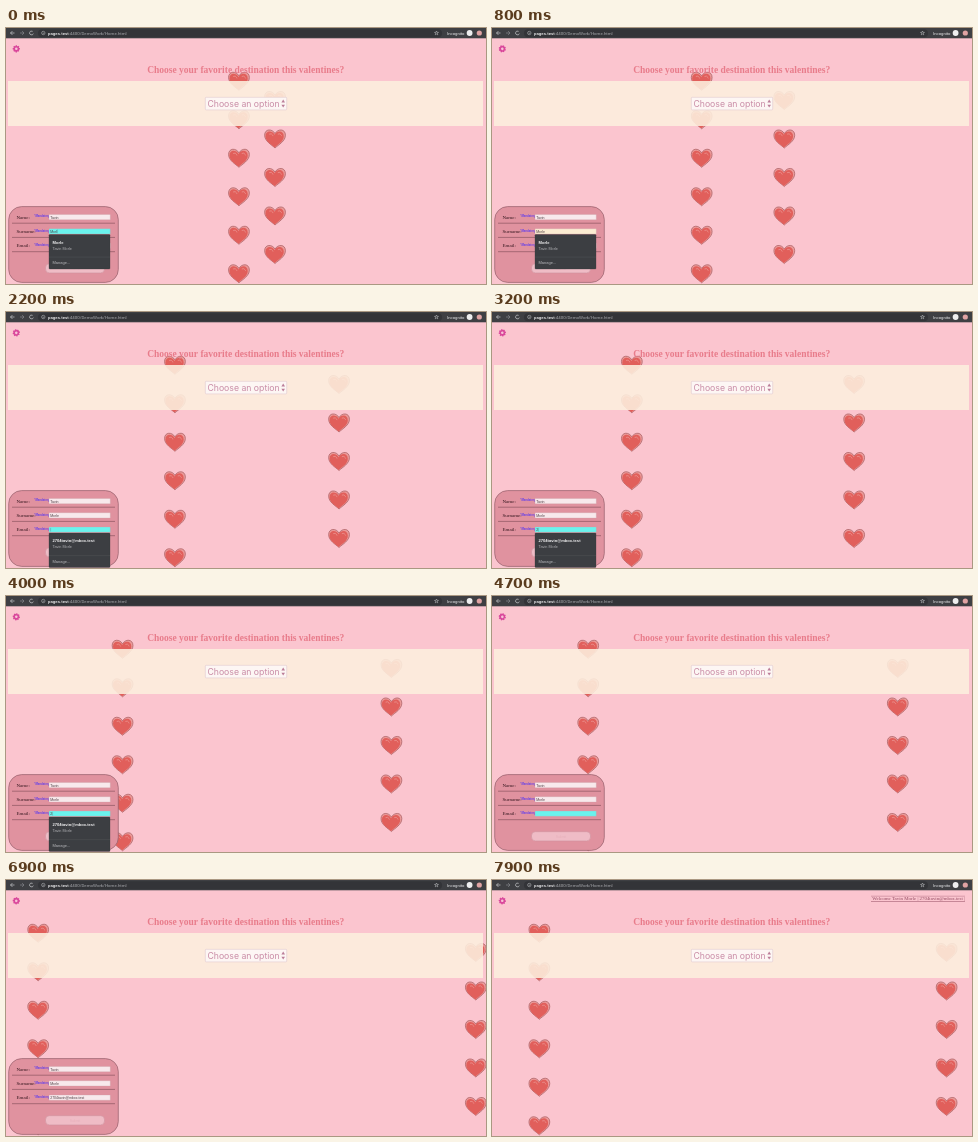
Animation of 480x256 px, one loop 8 s. Source, as an HTML page with a canvas:

```html
<!DOCTYPE html>
<html lang="en">
<head>
<meta charset="utf-8">
<title>Valentines destination</title>
<style>
  html, body { margin: 0; width: 100%; height: 100%; overflow: hidden; background: #fbc5cf; }
  canvas { display: block; width: 480px; height: 256px; }
</style>
</head>
<body>
<canvas id="stage"></canvas>
<script>
const W = 480, H = 256, LOOP = 8;
const SANS = '"Liberation Sans", Arial, sans-serif';
const SERIF = '"Liberation Serif", Times, serif';
const UI = 'Roboto, "Liberation Sans", sans-serif';
const FIRST = 'Tavin', LAST = 'Morle', MAIL = '2704tavin@mbox.test';
const SPEED = 29.1, TURN = 7.14, SUBMIT = 7.4;

const canvas = document.getElementById('stage');
const ctx = canvas.getContext('2d');
const dpr = window.devicePixelRatio || 1;
canvas.width = W * dpr;
canvas.height = H * dpr;

function rect(x, y, w, h, fill) {
  ctx.fillStyle = fill;
  ctx.fillRect(x, y, w, h);
}

function box(x, y, w, h, r, fill, line, width = 0.6) {
  ctx.beginPath();
  ctx.roundRect(x, y, w, h, r);
  ctx.fillStyle = fill;
  ctx.fill();
  if (line) {
    ctx.strokeStyle = line;
    ctx.lineWidth = width;
    ctx.stroke();
  }
}

function disc(x, y, r, fill) {
  ctx.beginPath();
  ctx.arc(x, y, r, 0, Math.PI * 2);
  ctx.fillStyle = fill;
  ctx.fill();
}

function line(color, width, ...pts) {
  ctx.beginPath();
  for (let i = 0; i < pts.length; i += 2) ctx.lineTo(pts[i], pts[i + 1]);
  ctx.strokeStyle = color;
  ctx.lineWidth = width;
  ctx.stroke();
}

function text(str, x, y, font, color, align = 'left') {
  ctx.font = font;
  ctx.fillStyle = color;
  ctx.textAlign = align;
  ctx.fillText(str, x, y);
}

function heartPath() {
  ctx.beginPath();
  ctx.moveTo(0, 9);
  ctx.bezierCurveTo(-3.4, 5.8, -10.4, 2.2, -10.4, -3.8);
  ctx.bezierCurveTo(-10.4, -10.4, -2.8, -10.6, 0, -5.4);
  ctx.bezierCurveTo(2.8, -10.6, 10.4, -10.4, 10.4, -3.8);
  ctx.bezierCurveTo(10.4, 2.2, 3.4, 5.8, 0, 9);
  ctx.closePath();
}

function heart(x, y) {
  ctx.save();
  ctx.translate(x, y);
  heartPath();
  ctx.fillStyle = '#eb9a99';
  ctx.fill();
  ctx.strokeStyle = '#a75c61';
  ctx.lineWidth = 0.7;
  ctx.stroke();
  ctx.translate(-0.4, 0.5);
  ctx.scale(0.88, 0.88);
  heartPath();
  ctx.fillStyle = '#e15f5b';
  ctx.fill();
  for (const lobe of [-4.8, 5]) {
    ctx.beginPath();
    ctx.arc(lobe, -3.4, 3, Math.PI * 1.35, Math.PI * 1.95);
    ctx.strokeStyle = '#efa39f';
    ctx.lineWidth = 0.7;
    ctx.stroke();
  }
  ctx.restore();
}

function hearts(t) {
  const shift = SPEED * (t < TURN ? t : 2 * TURN - t);
  for (let i = 0; i < 6; i++) heart(233 - shift, 53.3 + i * 38.5);
  for (let i = 0; i < 5; i++) heart(269 + shift, 72.5 + i * 38.5);
}

function toolbar() {
  const pale = '#c9cacd';
  rect(0, 0, W, 10.3, '#3e3f43');
  box(32, 1.2, 404, 8, 4, '#333438');
  line(pale, 0.7, 8.5, 5, 4.5, 5);
  line(pale, 0.7, 6.4, 3.1, 4.5, 5, 6.4, 6.9);
  line('#85868a', 0.7, 14, 5, 18, 5);
  line('#85868a', 0.7, 16.1, 3.1, 18, 5, 16.1, 6.9);
  ctx.beginPath();
  ctx.arc(25.5, 5, 1.9, 0.3, 5.4);
  ctx.strokeStyle = pale;
  ctx.stroke();
  ctx.beginPath();
  ctx.arc(37.3, 5, 1.7, 0, 7);
  ctx.lineWidth = 0.5;
  ctx.stroke();
  line(pale, 0.5, 37.3, 4.6, 37.3, 6);
  text('pages.test', 42, 6.6, `500 4.4px ${UI}`, '#f4f4f5');
  const used = ctx.measureText('pages.test').width;
  text(':4400/DemoWork/Home.html', 42 + used, 6.6, `4.4px ${UI}`, '#a9aaae');
  ctx.beginPath();
  for (let i = 0; i < 10; i++) {
    const a = i * Math.PI / 5 - Math.PI / 2, r = i % 2 ? 0.9 : 2.1;
    ctx.lineTo(430.5 + r * Math.cos(a), 5.1 + r * Math.sin(a));
  }
  ctx.closePath();
  ctx.strokeStyle = pale;
  ctx.lineWidth = 0.5;
  ctx.stroke();
  text('Incognito', 441, 6.6, `4.2px ${UI}`, '#eeeeef');
  disc(463.6, 5, 2.9, '#eeeeef');
  disc(473.3, 5, 2.6, '#e0a3a3');
}

function gear(t) {
  const pink = '#d9479b';
  ctx.save();
  ctx.translate(10.3, 20.8);
  ctx.rotate(t * 2.4);
  for (let i = 0; i < 8; i++) {
    ctx.rotate(Math.PI / 4);
    rect(-0.7, -3.6, 1.4, 1.6, pink);
  }
  disc(0, 0, 2.9, pink);
  disc(0, 0, 1.3, '#f8c3d5');
  ctx.restore();
}

function chooser() {
  text('Choose your favorite destination this valentines?', 239.7, 44.8,
    `bold 9.5px ${SERIF}`, '#e87c8b', 'center');
  ctx.globalAlpha = 0.88;
  rect(2, 53, 475, 45, '#fdefde');
  ctx.globalAlpha = 1;
  box(199.3, 69.3, 81.4, 12.6, 0.8, '#fdf6f4', '#dfc8cf');
  text('Choose an option', 201.4, 79, '8.7px Inter, sans-serif', '#c98ca6');
  ctx.fillStyle = '#bb7d98';
  for (const s of [-1, 1]) {
    ctx.beginPath();
    ctx.moveTo(275.4, 75.6 + s * 1.2);
    ctx.lineTo(279, 75.6 + s * 1.2);
    ctx.lineTo(277.2, 75.6 + s * 4);
    ctx.fill();
  }
}

function field(label, y, value, fill, caret) {
  text(label, 10.5, y + 1.3, `5px ${SERIF}`, '#35171f');
  text('*Mandatory', 28.3, y - 0.1, `bold italic 2.8px ${SANS}`, '#6440ea');
  box(43, y - 2.9, 61.3, 5.3, 0.3, fill, '#c79ca4', 0.3);
  text(value, 44.2, y + 1.1, `3.5px ${SANS}`, '#4a3b40');
  if (caret) {
    const x = 44.6 + ctx.measureText(value).width;
    line('#556', 0.3, x, y - 2, x, y + 1.6);
  }
  line('#7d4a55', 0.6, 6, y + 5.8, 109, y + 5.8);
}

function suggest(y, main, full) {
  box(43, y, 61, full ? 34.5 : 15.5, 0.8, '#3c3e42', '#35363a', 0.3);
  text(main, 46.5, y + 9, `${full ? 'bold ' : ''}4.1px ${SANS}`, '#f2f2f3');
  if (!full) return;
  text(`${FIRST} ${LAST}`, 46.5, y + 15.4, `3.8px ${SANS}`, '#b0b1b5');
  line('#515357', 0.5, 43, y + 22.6, 104, y + 22.6);
  text('Manage...', 46.5, y + 29.6, `4px ${SANS}`, '#bcbdc0');
}

function mailTyped(t) {
  if (t >= 6.2) return MAIL;
  if (t >= 5) return MAIL.slice(0, Math.min(4, 1 + Math.floor((t - 5) / 0.2)));
  return t >= 2.7 && t < 4.2 ? MAIL[0] : '';
}

function form(t) {
  const plain = '#f8e9ec', focus = '#6af3ed', preview = '#fbecd2';
  const lastFill = t < 0.4 ? focus : t < 1.2 ? preview : plain;
  const mailFocus = t >= 1.8 && t < 6.6;
  const mailMenu = t >= 1.8 && t < 4.2;
  box(2.7, 178.6, 109.6, 75.8, 13, '#e0929f', '#945f6a', 0.7);
  box(39.5, 235.7, 59, 9.2, 4, '#efbcc6', '#cb919c', 0.5);
  text('Submit', 69, 241.6, `3.4px ${SANS}`, '#e6b0bb', 'center');
  field('Name:', 189.4, FIRST, plain);
  field('Surname:', 203.6, t < 0.4 ? LAST.slice(0, 4) : LAST, lastFill, t < 0.4);
  field('Email:', 217.9, mailTyped(t), mailFocus ? focus : plain, mailMenu);
  if (t < 1.2) suggest(206.5, LAST, true);
  else if (mailMenu) suggest(221, MAIL, true);
  else if (t >= 5 && t < 6.2) suggest(221, MAIL, false);
}

function welcome() {
  text(`Welcome ${FIRST} ${LAST} | ${MAIL} |`, 473, 20.4, `4.9px ${SERIF}`, '#91485f', 'right');
  line('#b26d82', 0.5, 379, 16.2, 473, 16.2);
  line('#91485f', 0.5, 379, 21.5, 473, 21.5);
}

function draw(t) {
  ctx.setTransform(dpr, 0, 0, dpr, 0, 0);
  rect(0, 0, W, H, '#fbc5cf');
  hearts(t);
  chooser();
  gear(t);
  if (t < SUBMIT) form(t);
  else welcome();
  toolbar();
}

function tick(now) {
  draw(now / 1000 % LOOP);
  requestAnimationFrame(tick);
}
draw(0);
requestAnimationFrame(tick);
</script>
</body>
</html>
```
